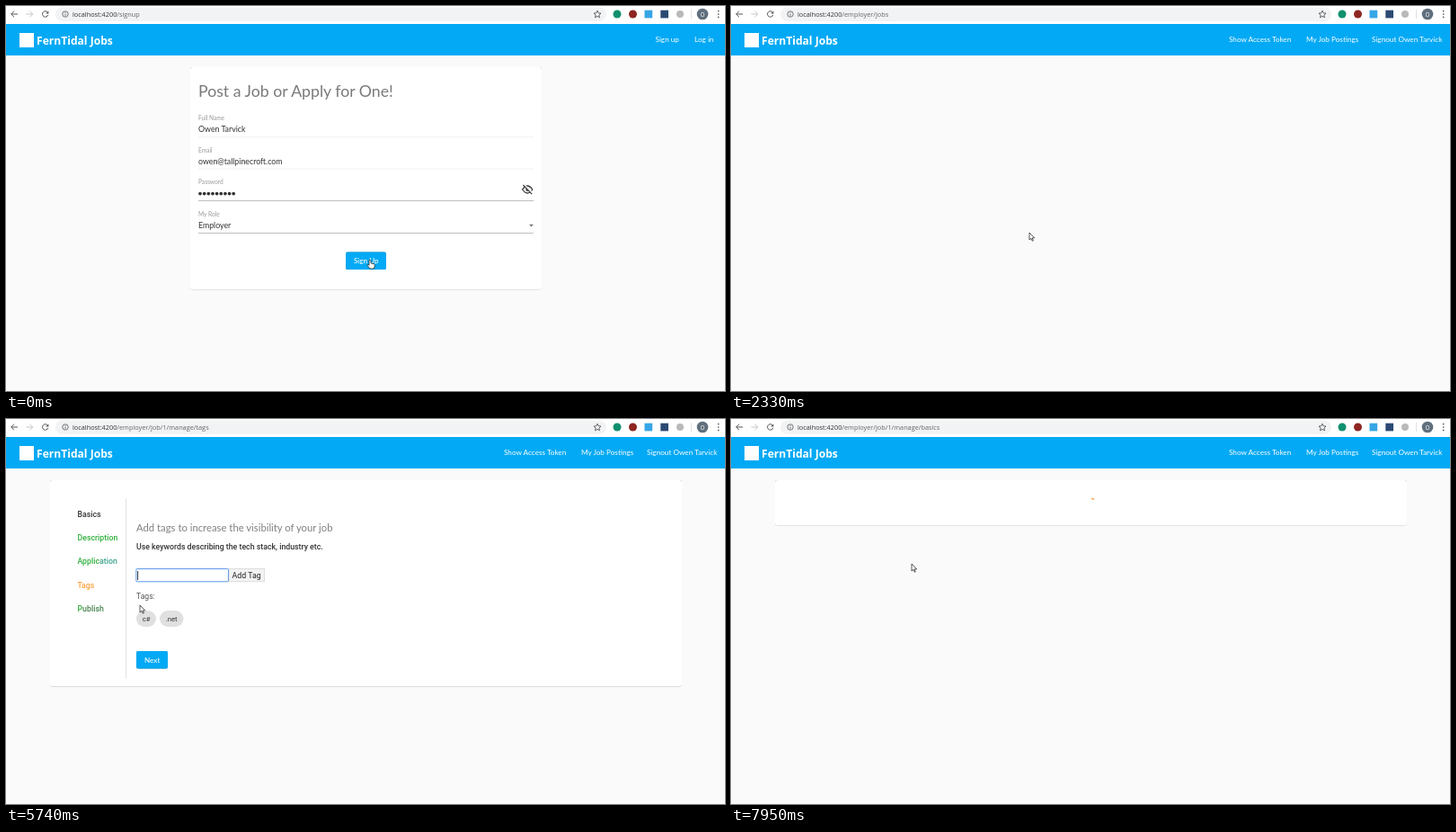
Write an HTML page that moves like this. It is 800 px wide and 428 px high and loops after 8 s.

```html
<!DOCTYPE html>
<html lang="en">
<head>
<meta charset="utf-8">
<title>Job posting walkthrough</title>
<style>
html, body { margin: 0; width: 100%; height: 100%; overflow: hidden; background: #fafafa; }
svg { display: block; width: 100%; height: 100%; font-family: Lato, "Open Sans", sans-serif; }
text { white-space: pre; }
.ui { font-family: "Open Sans", "Noto Sans", sans-serif; }
.mid { font-weight: 500; }
.bold { font-weight: 700; }
.rob { font-family: Roboto, sans-serif; }
.med { font-family: Roboto, sans-serif; font-weight: 500; }
.lift { filter: drop-shadow(0 .7px .7px rgba(0,0,0,.5)); }
.panel { filter: drop-shadow(0 1px 2px rgba(0,0,0,.45)); }
</style>
</head>
<body>
<svg id="stage" viewBox="0 0 800 428" preserveAspectRatio="none"></svg>
<script>
const stage = document.getElementById('stage');
const LOOP = 8000, BLUE = '#03a9f4', ORANGE = '#ffa33f', GREEN = '#2fb03c';
const USER = 'Owen Tarvick', MAIL = 'owen@tallpinecroft.com', BRAND = 'FernTidal Jobs';

const ticks = [0, 320, 480, 640, 800, 950, 1110, 1270, 1430, 1590, 1740, 1900, 2190, 2340, 2480, 2930,
  3250, 3410, 3570, 3720, 3860, 4010, 4170, 4320, 4490, 4630, 4790, 4940, 5100, 5260, 5410, 5570, 5740,
  5890, 6050, 6210, 6360, 6520, 6670, 6830, 6990, 7150, 7300, 7460, 7630, 7790, 7950];

// Pointer path: time, x, y, 1 for a hand.
const path = [
  [0, 405, 282, 1], [640, 405, 282, 0], [1110, 330, 284, 0], [1430, 112, 293, 1], [1590, 112, 293, 0],
  [1900, 332, 252, 0], [2190, 332, 252, 0], [2480, 444, 153, 0], [2930, 417, 152, 1], [3410, 417, 152, 1],
  [3720, 163, 315, 1], [4010, 163, 246, 0], [4320, 253, 171, 0], [4630, 253, 171, 0], [4940, 255, 173, 0],
  [5260, 253, 172, 0], [5740, 149, 207, 0], [5890, 162, 265, 1], [6050, 162, 265, 0], [6210, 230, 215, 0],
  [6520, 181, 247, 0], [6830, 181, 247, 0], [6990, 163, 256, 1], [7150, 163, 256, 0], [7630, 201, 161, 0],
  [8000, 201, 161, 0]
];

const text = (x, y, s, size, fill = '#333', cls = '') =>
  `<text x="${x}" y="${y}" font-size="${size}" fill="${fill}" class="${cls}">${s}</text>`;
const rect = (x, y, w, h, fill, extra = '') =>
  `<rect x="${x}" y="${y}" width="${w}" height="${h}" fill="${fill}" ${extra}/>`;
const circle = (x, y, r, fill, extra = '') =>
  `<circle cx="${x}" cy="${y}" r="${r}" fill="${fill}" ${extra}/>`;
const line = (d, stroke, w = 1, extra = '') =>
  `<path d="${d}" fill="none" stroke="${stroke}" stroke-width="${w}" ${extra}/>`;
const card = (x, y, w, h) => rect(x, y, w, h, '#fff', 'rx="2.5" class="lift"');
const rule = (x, y, w, color, th = .7) => rect(x, y, w, th, color);
const caret = (x, y, fill) => `<path d="M${x - 2.5} ${y - 1.2}h5l-2.5 2.6z" fill="${fill}"/>`;
const title = (x, y, s) => text(x, y, s, 19.7, '#303838');
const subtitle = (x, y, s) => text(x, y, s, 11.3, '#808080');

function dots(x, y, gap, r) {
  let s = '';
  for (let i = 0; i < 9; i++) s += circle(x + i * gap, y, r, '#333');
  return s;
}

function button(x, y, w, label, pressed) {
  return rect(x, y, w, 19.5, BLUE, 'rx="2" class="lift"') +
    (pressed ? rect(x, y, w, 19.5, '#fff', 'rx="2" opacity=".15"') : '') +
    text(x + 9, y + 12.6, label, 8.1, '#fff', 'mid');
}

function browser(url, secure, loading) {
  const cut = url.indexOf('/');
  const reload = loading
    ? line('M40.7 6.2l5.8 5.8m0-5.8l-5.8 5.8', '#555')
    : line('M46.4 7.2a3.2 3.2 0 1 0 .4 2.7', '#555') + '<path d="M47.4 5.4v3.2h-3.2z" fill="#555"/>';
  const badge = secure
    ? rect(63.4, 8, 5, 4.2, '#555', 'rx=".6"') + line('M64.5 8v-1a1.4 1.4 0 0 1 2.8 0v1', '#555', .8)
    : circle(66, 9, 3.2, 'none', 'stroke="#555" stroke-width=".8"') + line('M66 8.6v2.2m0-3.8v.9', '#555', .8);
  return rect(0, 0, 800, 20, '#fff') + rect(55, 1.5, 613, 15.5, '#f1f3f4', 'rx="7.7"') +
    line('M13 9H5.8m3.2-3.3L5.7 9 9 12.3', '#555') +
    line('M22.5 9h7.2m-3.2-3.3L29.8 9l-3.3 3.3', '#c4c6c8') + reload + badge +
    text(74, 11.8, `${url.slice(0, cut)}<tspan fill="#666">${url.slice(cut)}</tspan>`, 7.32, '#333', 'ui') +
    line('M658 5.2l1.2 2.6 2.8.3-2.1 1.9.6 2.8-2.5-1.4-2.5 1.4.6-2.8-2.1-1.9 2.8-.3z', '#444', .8) +
    circle(680, 9, 4.5, '#11906f') + circle(697.5, 9, 4.5, '#8e2622') + rect(710.5, 4.7, 8.7, 8.7, '#36a6e6') +
    rect(728.3, 4.7, 8.7, 8.7, '#2b4a73') + circle(750, 9, 4, '#b9b9b9') +
    rect(762, 4, .7, 10, '#d4d4d4') + circle(775, 9, 6.3, '#5f6f7d') +
    text(772.6, 11.5, 'O', 6.4, '#fff', 'ui') + [5.6, 9, 12.4].map(y => circle(792.7, y, .85, '#555')).join('');
}

function shell(url, signedIn) {
  const nav = signedIn
    ? [[554, 'Show Access Token'], [640, 'My Job Postings'], [713, 'Signout ' + USER]]
    : [[722.5, 'Sign up'], [766, 'Log in']];
  return rect(0, 20, 800, 408, '#fafafa') + rect(0, 20, 800, 35, BLUE) + rect(15, 30, 16, 16, '#fff') +
    text(34, 42.6, BRAND, 12.1, '#fff', 'ui bold') +
    nav.map(([x, s]) => text(x, 40, s, 8.2, '#fff')).join('') + browser(url);
}

function signup(t) {
  const field = (y, label, value, color) =>
    text(214, y, label, 6.6, '#999') + text(214, y + 13, value, 8.8) + rule(214, y + 18.1, 373, color);
  return shell('localhost:4200/signup') + card(205, 68, 391, 247.3) +
    text(214, 100.8, 'Post a Job or Apply for One!', 17.7, '#7a7a7a') +
    field(127, 'Full Name', USER, '#ececec') + field(162.5, 'Email', MAIL, '#ececec') +
    field(198, 'Password', '', '#a4a4a4') + field(234, 'My Role', 'Employer', '#a4a4a4') +
    dots(216, 208.6, 4.65, 1.85) + caret(584.5, 244, '#777') +
    line('M574.6 204q5.6-8 11.2 0q-5.6 8-11.2 0z', '#333', 1.3) + circle(580.2, 204, 1.9, '#333') +
    line('M576.2 198.8l9.6 9.9', '#fff', 2.4) + line('M575.4 199l9.8 10.2', '#333', 1.1) +
    button(378, 273.5, 45, 'Sign Up', t >= 320);
}

const loginUrl = 'localhost:8787/Accounts/Login?ReturnUrl=%2Fconnect%2Fauthorize%2Fcallback%3Fclient_id' +
  '%3Dangular_spa%26redirect_uri%3Dhttp%253A%252F%252Flocalhost%2...';

function login(t) {
  const sent = t >= 1590;
  const box = (y, h) => rect(91.3, y, 180.7, h, '#fff', 'rx="2" stroke="#d3d8dd" stroke-width=".7"');
  return rect(0, 20, 800, 408, '#fff') + rect(0, 20, 796, 32, '#07a8f8') +
    rect(795.5, 20, 4.5, 408, '#f1f1f1') + rect(796, 29, 4, 399, '#c1c1c1') +
    '<path d="M796.3 26l1.7-2.2 1.7 2.2z" fill="#777"/>' + browser(loginUrl, true, sent) +
    rect(92, 28.5, 17, 17, '#fff') + '<g class="ui">' + text(113, 42, BRAND, 12.95, '#fff', 'bold') +
    text(91, 105, 'Local Login', 17.2, '#212529', 'mid') +
    rect(91.3, 122.3, 180.7, 27.4, '#d4edda', 'rx="2" stroke="#c3e6cb" stroke-width=".7"') +
    text(102.7, 139.5, 'Account created successfully!', 8.3, '#2b4f40') +
    text(91, 168.5, 'Username', 8.1) + box(176.3, 24.6) +
    (t >= 950 ? text(97, 192.3, MAIL, 8.3, '#495057') : '') +
    text(91, 219.7, 'Password', 8.1) + box(227.5, 25) + (t >= 1110 ? dots(98.8, 240.5, 3.7, 1.15) : '') +
    rect(91.5, 262.5, 6, 6, '#fff', 'rx="1" stroke="#888" stroke-width=".7"') +
    text(100, 268.9, 'Remember My Login', 6.2, '#222', 'bold') +
    (sent ? rect(89.5, 283.2, 39, 23.4, '#80bdff', 'rx="3"') : '') +
    rect(91.2, 285, 35.6, 20, sent ? '#0778f2' : '#007bff', 'rx="2"') +
    text(98.2, 298.2, 'Login', 8.4, '#fff') + text(136.7, 298.2, 'Cancel', 8.2, '#495057') + '</g>';
}

function postButton(x, y, r) {
  const ix = x + 10.5, iy = y + 5;
  return rect(x, y, 83, 19.5, '#fff', 'rx="2" class="panel"') +
    `<clipPath id="btn">${rect(x, y, 83, 19.5, '#fff', 'rx="2"')}</clipPath>` +
    (r ? circle(417.5, 154, r, '#e2e2e2', 'clip-path="url(#btn)"') : '') +
    line(`M${ix + 5.5} ${iy + 1}h-5v8.4h8v-5`, '#222', 1.5) +
    line(`M${ix + 2} ${iy + 3.8}h4m-4 2h5m-5 2h5`, '#222') +
    line(`M${ix + 8.4} ${iy - .8}v4.4m-2.2-2.2h4.4`, '#222', 1.3) +
    text(x + 23.5, y + 12.6, 'Post a new job', 8.2, '#444');
}

function empty(t) {
  const url = t < 3410 ? 'localhost:4200/employer/jobs' : 'localhost:4200/employer/job/1/manage/basics';
  const head = shell(url, true);
  if (t < 2340) return head;
  const r = t >= 3410 ? 38 : t >= 3250 ? 16 : 0;
  return head + card(167, 68, 467, 107.5) + title(176, 107, 'My Job Postings') +
    text(176, 132.2, "Looks like you haven't posted any jobs yet - post one now!", 9, '#2c3f48') +
    postButton(359, 143, r);
}

function loading() {
  return shell('localhost:4200/employer/job/1/manage/basics', true) + card(49, 68, 703, 50.3) +
    line('M401.2 88.6q1.4-.2 2.6.9', ORANGE, 1.6);
}

function sidebar(active, bottom, done) {
  const items = {
    Basics: '#333', Description: GREEN, Application: GREEN, Tags: done ? '#333' : GREEN, Publish: GREEN
  };
  const tint = {
    Application: 'Applic<tspan fill="#38a08c">ation</tspan>',
    Publish: 'P<tspan fill="#47824e">ublish</tspan>'
  };
  return card(49, 68, 703, bottom - 68) + rect(133, 88, .8, bottom - 97, '#dcdcdc') +
    Object.entries(items).map(([name, color], i) => {
      const on = name === active;
      return text(79.5, 108.6 + i * 26.4, on ? name : tint[name] || name, 8.75, on ? ORANGE : color, 'med');
    }).join('');
}

const manage = page => shell('localhost:4200/employer/job/1/manage/' + page, true);

function form(page, heading, bottom) {
  return manage(page.toLowerCase()) + sidebar(page, bottom) + subtitle(145, 124.5, heading) +
    rule(145, 166, 580, '#a4a4a4') + rule(145, 202, 580, '#a4a4a4') + button(145, bottom - 39.5, 35, 'Next');
}

function tags(t) {
  const chips = t >= 5260 ? 2 : t >= 4490 ? 1 : 0, grow = chips ? 21.7 : 0;
  let typed = '';
  if (t >= 4320 && t < 4490) typed = 'C#';
  if (t >= 4790 && t < 5260) typed = '.net'.slice(0, t >= 4940 ? 4 : 2);
  const chip = (x, w, s) => rect(x, 213, w, 18, '#e0e0e0', 'rx="9"') + text(x + 6.7, 224.8, s, 7.7, '#333', 'rob');
  return manage('tags') + sidebar('Tags', 275.8 + grow) +
    subtitle(145, 124.5, 'Add tags to increase the visibility of your job') +
    text(145, 145, 'Use keywords describing the tech stack, industry etc.', 8.75, '#333', 'med') +
    rect(248, 166.5, 39.6, 14.3, '#f3f3f3', 'stroke="#d2d2d2" stroke-width=".7"') +
    rect(144.9, 166.6, 102.5, 14.2, '#fff', 'rx=".8" stroke="#5b97e8"') +
    text(146, 176.7, typed, 8.7, '#222', 'rob') + (typed ? '' : rect(146.2, 169, .9, 10, '#222')) +
    text(251.5, 176.7, 'Add Tag', 8.8, '#222', 'rob') + text(145, 200, 'Tags:', 8.6, '#555', 'rob') +
    (chips > 0 ? chip(145, 22, 'c#') : '') + (chips > 1 ? chip(171, 26.5, '.net') : '') +
    button(145, 236.3 + grow, 35, 'Next', t >= 5890);
}

function publish(t) {
  const open = t >= 6360 && t < 6830, hue = t >= 6360 ? BLUE : '#999';
  const chosen = t >= 6670;
  const option = (y, s, fill = '#333') => text(145, y, s, 9, fill);
  let panel = '';
  if (open) {
    panel = `<g opacity="${chosen ? .47 : 1}">` + rect(136, 205, 194, 79, '#fff', 'rx="2" class="panel"') +
      (t >= 6520 ? rect(136, 231.6, 194, 26.4, '#e6e6e6') : '') +
      (chosen ? rect(136, 231.6, 152.5, 26.4, '#d0d0d0') : '') +
      option(221, 'Draft') + option(247.3, 'Published', chosen ? BLUE : '#333') +
      option(273.7, 'Deleted') + '</g>';
  }
  return manage('publish') + sidebar('Publish', 288.3, true) + title(145, 118, 'Almost done!') +
    subtitle(145, 161.5, "Publish your job when it's ready to go live") +
    text(145, 187.5, 'Fill out the sections and set the status to <tspan font-style="italic">Published</tspan>' +
      ' to ensure your post is visible to the public.', 8.77, '#333', 'med') +
    text(145, 207.6, 'Post Status', 6.6, hue) + option(221, t >= 6520 ? 'Published' : 'Draft') +
    caret(315.5, 218, hue) + rule(145, 226, 176, hue, 1) +
    button(145, 248.5, 35, 'Save', t >= 7150) + panel;
}

function list() {
  return shell('localhost:4200/employer/jobs', true) + card(49, 68, 703, 170) +
    title(58, 107, 'My Job Postings') + rule(58, 146, 685, '#dcdcdc') +
    text(190, 167, 'New job', 9) + text(460, 167, 'Published', 9) + rule(58, 180, 685, '#dcdcdc') +
    postButton(359, 200);
}

function pointer(t) {
  const i = path.findIndex(p => p[0] > t) - 1, [t0, x0, y0, hand] = path[i], [t1, x1, y1] = path[i + 1];
  const k = (t - t0) / (t1 - t0), x = x0 + (x1 - x0) * k, y = y0 + (y1 - y0) * k;
  const d = hand
    ? 'M-1 1q1-1.8 2 0v3l3.4.7q1.1.4.9 1.6l-.8 3.7H0l-3-3.7q.2-1.4 1.4-.6l.6.6z'
    : 'M0 0v8l1.9-1.7 1.3 2.9 1.2-.5-1.3-2.8h2.6z';
  return `<path transform="translate(${x} ${y})" d="${d}" fill="#fff" stroke="#222" stroke-width=".75"/>`;
}

// Each page and the time it takes over.
const pages = [
  [0, signup], [800, login], [2190, empty], [3570, loading],
  [3720, () => form('Basics', 'Add the basics of your job', 339.5)],
  [3860, () => form('Description', 'Describe your job', 285)],
  [4010, () => form('Application', 'Tell people how to apply', 285)],
  [4170, tags], [6050, publish], [7300, list], [7950, loading]
];

const latest = (items, t, key = v => v) => items.filter(v => key(v) <= t).pop();
const start = performance.now();
let shown = -1;

function draw(now) {
  const t = latest(ticks, Math.max(0, now - start) % LOOP);
  if (t !== shown) {
    shown = t;
    stage.innerHTML = latest(pages, t, p => p[0])[1](t) + pointer(t);
  }
  requestAnimationFrame(draw);
}
draw(start);
</script>
</body>
</html>
```
